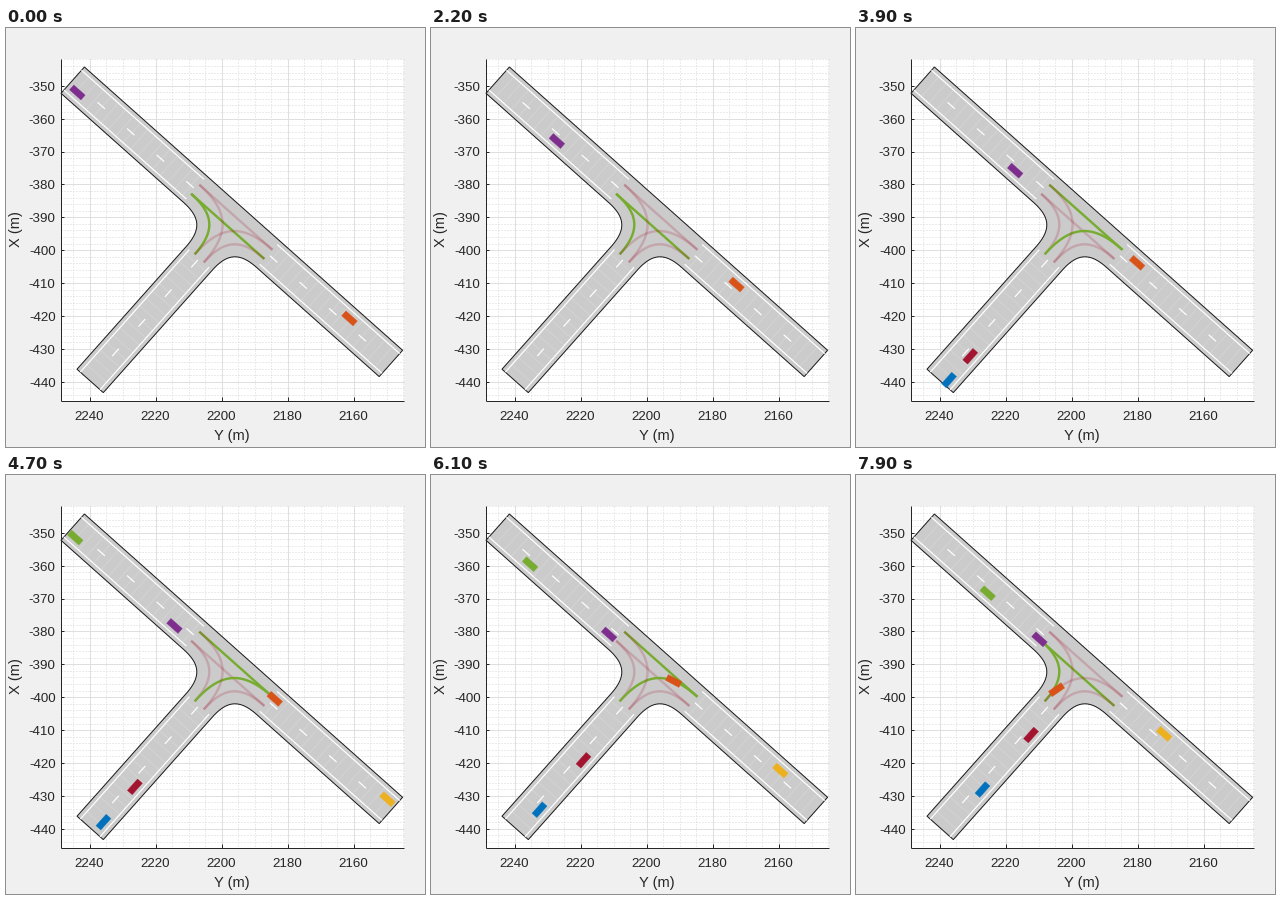
These frames come from a looping animation (419 by 419 pixels, 8 s). A matplotlib script:

```python
import numpy as np
import matplotlib.pyplot as plt
from matplotlib.animation import FuncAnimation
from matplotlib.collections import LineCollection
from matplotlib.patches import Polygon, Rectangle

SIZE, DPI = 419, 64
PX = 72 / DPI                      # points per pixel
STEP, COUNT = 100, 80
INK, ROAD = "#262626", "#cbcbcb"
GREEN, RED = "#77ac30", "#a2142f"

plt.rcParams["font.family"] = "Liberation Sans"
fig = plt.figure(figsize=(SIZE / DPI, SIZE / DPI), dpi=DPI, facecolor="#f0f0f0")
ax = fig.add_axes([0, 0, 1, 1])
ax.set_xlim(0, SIZE)
ax.set_ylim(SIZE, 0)
ax.axis("off")

# Junction frame: u runs along the main road, v down the side road.
CENTER = np.array([225.8, 193.8])
AXES = np.array([[0.747, 0.665], [-0.665, 0.747]])
ARM, MOUTH, HALF, LANE, EDGE = 213, 49, 17.6, 6.1, 13.2


def to_px(pts):
    return CENTER + np.asarray(pts, float) @ AXES


def lines(segs, color, width, z, **kw):
    ax.add_collection(LineCollection(segs, colors=color, linewidths=width * PX,
                                     zorder=z, **kw))


def label(x, y, text, size, ha="center", **kw):
    ax.text(x, y, text, fontsize=size * PX, color=INK, ha=ha, va="baseline",
            rotation_mode="anchor", **kw)


def turn(a, corner, b, k=0.72, n=60):
    """Cubic curve from a to b, pulled towards the corner."""
    a, corner, b = (np.array(p, float) for p in (a, corner, b))
    t = np.linspace(0, 1, n)[:, None]
    c, d = a + k * (corner - a), b + k * (corner - b)
    return ((1 - t) ** 3 * a + 3 * t * (1 - t) ** 2 * c
            + 3 * t ** 2 * (1 - t) * d + t ** 3 * b)


# ---- plot area ----
L, R, T, B = 54.5, 397.5, 30.5, 372.5
ax.add_patch(Rectangle((L, T), R - L, B - T, fc="white", ec="none", zorder=0))
xs = 83.5 + 66 * np.arange(5)
ys = 57.7 + 32.9 * np.arange(10)


def grid(gx, gy):
    return ([[(x, T), (x, B)] for x in gx if L < x < R]
            + [[(L, y), (R, y)] for y in gy if T < y < B])


minor = grid(83.5 + 16.5 * np.arange(-1, 20), 57.7 + 6.58 * np.arange(-4, 48))
lines(minor, "#d9d9d9", 1, 1, linestyles=[(0, (1, 2))])
lines(grid(xs, ys), "#dfdfdf", 1, 1)
lines([[(L, T), (L, B)], [(L, B), (R, B)]], INK, 1, 8)
lines([[(x, B), (x, B - 3.5)] for x in xs]
      + [[(L, y), (L + 3.5, y)] for y in ys], INK, 1, 8)
for i, x in enumerate(xs):
    label(x, 392, str(2240 - 20 * i), 13.33)
for i, y in enumerate(ys):
    label(49.5, y + 5, str(-350 - 10 * i), 13.33, ha="right")
label(226, 412, "Y (m)", 14.67)
label(14, 201, "X (m)", 14.67, rotation=90)

# ---- roads ----
left = turn((-MOUTH, HALF), (-HALF, HALF), (-HALF, MOUTH))
outline = np.vstack([[(-ARM, -HALF), (ARM, -HALF), (ARM, HALF)],
                     left * [-1, 1], [(HALF, ARM), (-HALF, ARM)],
                     left[::-1], [(-ARM, HALF)]])
ax.add_patch(Polygon(to_px(outline), fc=ROAD, ec="#1a1a1a", lw=PX, zorder=2))

# Each arm maps (distance from its outer end, offset) to the junction frame.
ARMS = [lambda s, w: (s - ARM, w),
        lambda s, w: (ARM - s, w),
        lambda s, w: (w, ARM - s)]
inner = ARM - MOUTH
for arm in ARMS:
    seams = [to_px([arm(s, -EDGE), arm(s, EDGE)])
             for s in np.arange(9.9, inner, 9.9)]
    edges = [to_px([arm(0, w), arm(inner, w)]) for w in (-EDGE, EDGE)]
    dashes = [to_px([arm(s - 5, 0), arm(s + 5, 0)])
              for s in 38.2 + 39.6 * np.arange(4)]
    lines(seams, "#d5d5d5", 0.8, 3)
    lines(edges + dashes, "white", 1.2, 3, capstyle="butt")

# ---- lanes through the junction ----
M, W = MOUTH, LANE
straight_on = np.linspace((-M, W), (M, W), 60)
right_turn = turn((-M, W), (-W, W), (-W, M))
straight_back = np.linspace((M, -W), (-M, -W), 60)
left_turn = turn((M, -W), (-W, -W), (-W, M))
side_right = turn((W, M), (W, W), (M, W))
side_left = turn((W, M), (W, -W), (-M, -W))


def lane(pts, z):
    return ax.plot(*to_px(pts).T, lw=2.4 * PX, zorder=z,
                   solid_capstyle="butt")[0]


groups = [[lane(straight_on, 4), lane(right_turn, 4)],
          [lane(straight_back, 4.1), lane(left_turn, 4.1)],
          [lane(side_right, 4.2), lane(side_left, 4.2)]]

# ---- cars ----
LEAD, LAG = 20, 6


def route(start, path, end):
    pts = np.vstack([[start], path, [end]])
    dist = np.r_[0, np.cumsum(np.hypot(*np.diff(pts, axis=0).T))] - LEAD
    return dist, to_px(pts)


FAR = ARM + LEAD
from_left = route((-FAR, W), straight_on, (FAR, W))
from_right = route((FAR, -W), straight_back, (-FAR, -W))
right_to_side = route((FAR, -W), left_turn, (-W, FAR))
from_side = route((W, FAR), side_right, (FAR, W))


def at(way, s):
    dist, pts = way
    return np.array([np.interp(s, dist, pts[:, k]) for k in (0, 1)])


def ease(t, ts, ss):
    """Smooth cubic through the given times and distances."""
    slope = np.gradient(ss, ts, edge_order=1)
    i = int(np.clip(np.searchsorted(ts, t, side="right") - 1, 0, len(ts) - 2))
    h = ts[i + 1] - ts[i]
    x = (t - ts[i]) / h
    return (ss[i] * (1 + 2 * x) * (1 - x) ** 2 + slope[i] * h * x * (1 - x) ** 2
            + ss[i + 1] * x * x * (3 - 2 * x)
            + slope[i + 1] * h * x * x * (x - 1))


class Car:
    body = np.array([(-1, -1), (1, -1), (1, 1), (-1, 1)]) * [7.6, 3.2]

    def __init__(self, color, way, ts, ss):
        self.way = way
        self.ts, self.ss = np.array(ts, float), np.array(ss, float)
        self.patch = ax.add_patch(Polygon(self.body, fc=color, ec=color,
                                          lw=0.4 * PX, zorder=6))

    def move(self, t):
        shown = t >= self.ts[0] - 1e-6
        self.patch.set_visible(shown)
        if shown:
            s = ease(t, self.ts, self.ss)
            d = at(self.way, s - LAG + 1) - at(self.way, s - LAG - 1)
            d /= np.hypot(*d)
            turned = self.body @ np.array([d, (-d[1], d[0])])
            self.patch.set_xy(at(self.way, s) + turned)


cars = [
    Car("#7e2f8e", from_left, [0, 1, 2.2, 3.9, 5.4, 6.7, 7.9],
        [11.7, 45, 84.7, 129.3, 149.2, 157.7, 161.8]),
    Car("#d95319", right_to_side, [0, 1, 2.2, 3.9, 5.4, 6.7, 7.9],
        [60.9, 86.3, 111.8, 144.4, 176.3, 207.5, 238.2]),
    Car(RED, from_side, [2.8, 3.9, 5.4, 6.7, 7.9],
        [8, 38.4, 78.8, 109.2, 129.8]),
    Car("#0072bd", from_side, [3.7, 3.9, 5.4, 6.7, 7.9],
        [5.2, 6.5, 20.7, 38.4, 56.8]),
    Car(GREEN, from_left, [4.6, 5.4, 6.7, 7.9], [6, 29, 64.8, 92.5]),
    Car("#edb120", from_right, [4.6, 5.4, 6.7, 7.9], [7, 31.7, 71.4, 108.2]),
]


def draw(i):
    t = i * STEP / 1000
    go = 1 if 2.95 < t < 7.45 else 0
    for k, group in enumerate(groups):
        for line in group:
            line.set_color(GREEN if k == go else RED)
            line.set_alpha(1 if k == go else 0.2)
    for car in cars:
        car.move(t)
    return []


anim = FuncAnimation(fig, draw, frames=COUNT, interval=STEP, repeat=True,
                     repeat_delay=0, blit=False)
plt.show()
```
